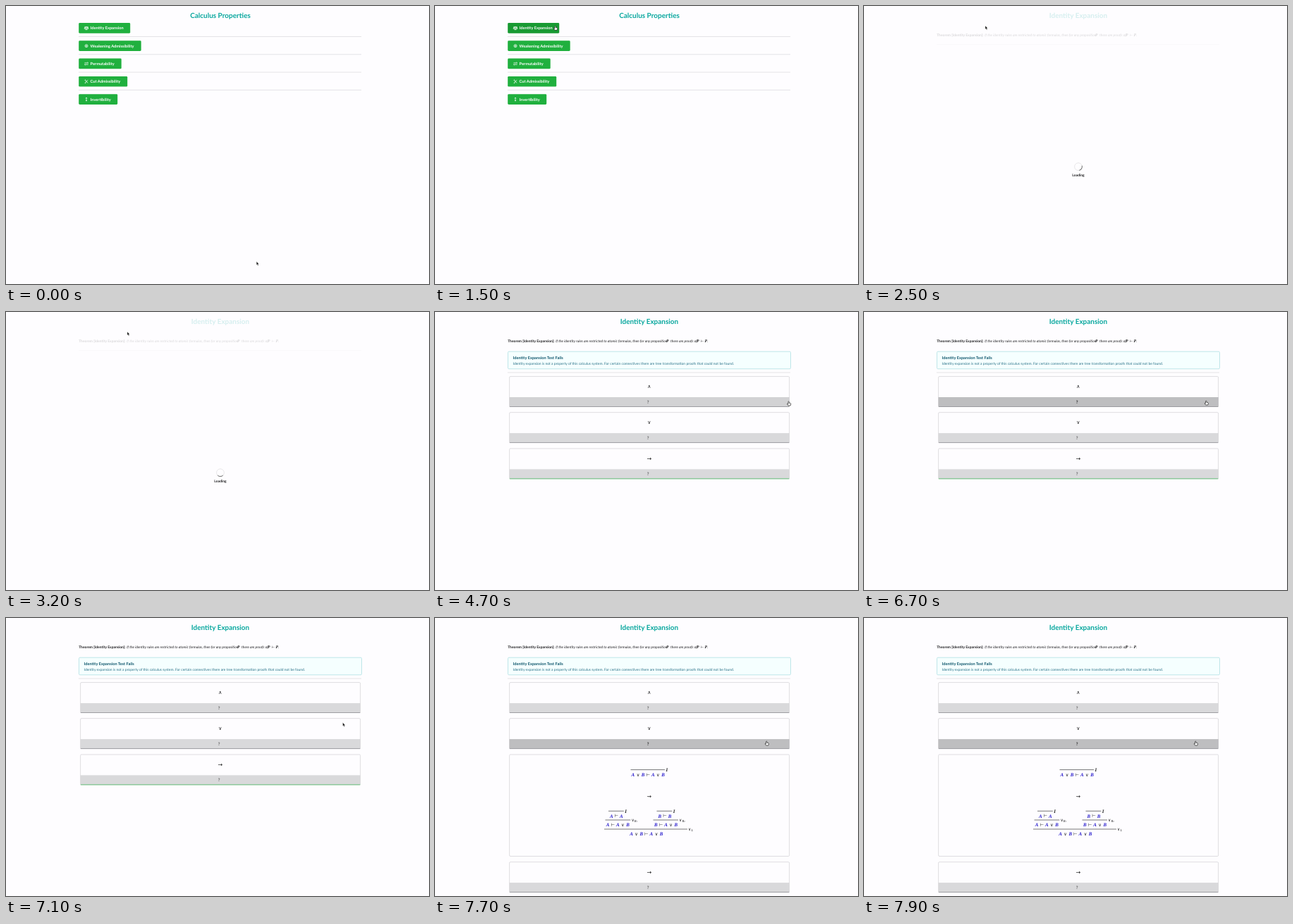
Animation of 600x395 px, one loop 8 s. Source, as an HTML page:

```html
<!DOCTYPE html>
<html lang="en">
<head>
<meta charset="utf-8">
<title>Calculus Properties</title>
<style>
  html, body { margin: 0; width: 100%; height: 100%; overflow: hidden; background: #fefdff; }
  svg { display: block; width: 600px; height: 395px; text-rendering: geometricPrecision; }
  text { font-family: Lato, sans-serif; white-space: pre; }
  .bold { font-weight: 700; }
  .italic { font-style: italic; }
  .mid { text-anchor: middle; }
  .var { font: italic 700 6.9px "Liberation Serif", serif; }
  .sym { font-family: "DejaVu Sans", sans-serif; }
</style>
</head>
<body>
<svg id="stage" viewBox="0 0 600 395"></svg>
<script>
const LOOP = 8000;
const PAGE_LEFT = 1900, LOAD_START = 2300, LOAD_END = 3300;
const OPEN_AND = 5200, CLOSE_AND = 6600, OPEN_OR = 7600;
const TEAL = '#08a79e', BLUE = '#2418cc', INK = '#1c1c1e';
const stage = document.getElementById('stage');

// Cursor stops: time, x, y
const PATH = [
  [0, 355.3, 363], [100, 355.3, 363], [900, 215, 115], [1350, 170, 28.5], [1900, 172, 28],
  [3400, 172, 28], [4000, 543, 100], [4200, 541, 105], [4700, 501.7, 127],
  [5000, 485.3, 126], [6700, 485.3, 126], [7100, 477.7, 148.5], [7450, 470.3, 175], [LOOP, 470.3, 175]
];

const clamp = v => Math.min(1, Math.max(0, v));
const mix = (a, b, k) => a + (b - a) * k;

function cursorAt(t) {
  const i = PATH.findIndex((stop, n) => n && t <= stop[0]);
  const [t0, x0, y0] = PATH[i - 1], [t1, x1, y1] = PATH[i];
  const k = (t - t0) / (t1 - t0);
  return [mix(x0, x1, k), mix(y0, y1, k)];
}

const text = (s, x, y, size, fill = INK, cls = '') =>
  `<text x="${x}" y="${y}" font-size="${size}" fill="${fill}" class="${cls}">${s}</text>`;
const rect = (x, y, w, h, fill, extra = '') =>
  `<rect x="${x}" y="${y}" width="${w}" height="${h}" fill="${fill}" ${extra}/>`;
const line = (x1, x2, y, stroke = INK, width = .6) =>
  `<path d="M${x1} ${y}H${x2}" stroke="${stroke}" stroke-width="${width}"/>`;
const divider = y => line(103, 504, y, '#dedee0', .8);
const title = s => text(s, 304, 16.6, 9.97, TEAL, 'bold mid');
const symbol = (s, x, cy, size) => text(s, x, cy + size * .32, size, INK, 'sym mid');
const variable = (s, x, cy, fill = BLUE) => text(s, x, cy + 2.3, 6.9, fill, 'var mid');

// Icons are drawn around their own centre.
const BUTTONS = [
  ['Identity Expansion', 73, 'M0-2.4V2.2M-2.5-1.6H2.5M-1.5 2.2H1.5M-3 .8 -1.9-1.5 -.8 .8ZM.8 .8 1.9-1.5 3 .8Z'],
  ['Weakening Admissibility', 88.5, 'M-2 0A2 2 0 1 1 2 0A2 2 0 1 1-2 0M-1 0H1M0-1V1'],
  ['Permutability', 60.5, 'M-2.6-1.1H2.6L1.4-2.1M2.6 1.1H-2.6L-1.4 2.1'],
  ['Cut Admissibility', 69, 'M-1.6-1.5 2.2 2M-1.6 1.5 2.2-2M-2.3-1.8A.7 .7 0 1 1-1-1.3M-2.3 1.8A.7 .7 0 1 0-1 1.3'],
  ['Invertibility', 55, 'M0-2.4V2.4M-1-1.4 0-2.5 1-1.4M-1 1.4 0 2.5 1 1.4']
];

function menuPage(hover) {
  return title('Calculus Properties') + BUTTONS.map(([label, width, icon], i) => {
    const y = 24 + i * 25.3;
    const fill = i === 0 ? `rgb(${mix(32, 24, hover)},${mix(176, 154, hover)},${mix(62, 50, hover)})` : '#20b03e';
    return rect(103.2, y, width, 14.7, fill, 'rx="1.4"')
      + `<path transform="translate(114 ${y + 7.4})" d="${icon}" fill="none" stroke="#fff" stroke-width=".75"/>`
      + text(label, 119.6, y + 9.4, 5.7, '#fff', 'bold')
      + (i < 4 ? divider(y + 19.5) : '');
  }).join('');
}

function theorem() {
  const math = (s, x) => `<tspan x="${x}" class="var" style="font-size:5.8px">${s}</tspan>`;
  return title('Identity Expansion')
    + text('Theorem [Identity Expansion]:', 103.2, 42.7, 4.98, INK, 'bold')
    + text('If the identity rules are restricted to atomic formulas, then for any proposition', 171.3, 42.7, 4.98, INK, 'italic')
    + text('there are proofs of', 334, 42.7, 4.98, INK, 'italic')
    + text(math('P', 328) + math('P', 371) + math('P', 382.5) + '.', 0, 42.7, 4.98)
    + symbol('⊢', 379, 41, 5);
}

function loader(t) {
  const angle = (t - LOAD_START) / 600 * 360;
  return '<circle cx="304" cy="228.3" r="5.4" fill="none" stroke="#e2e1e4" stroke-width=".8"/>'
    + `<path transform="translate(304 228.3) rotate(${angle})" d="M-3.8-3.8A5.4 5.4 0 0 1 3.8-3.8" fill="none" stroke="#666" stroke-width=".9"/>`
    + text('Loading', 304, 242.2, 4.98, INK, 'bold mid');
}

function sequent(tokens, cx, cy) {
  const step = 7.1, start = cx - (tokens.length - 1) * step / 2;
  return [...tokens].map((c, i) => /[AB]/.test(c)
    ? variable(c, start + i * step, cy) : symbol(c, start + i * step, cy, 6.3)).join('');
}

// A rule line with its name to the right and the conclusion below.
function rule(tokens, cx, y, x1, x2, name = 'I', sub = '', index = '') {
  const label = name === 'I' ? variable('I', x2 + 2.8, y, INK) : symbol(name, x2 + 3.2, y, 5.8)
    + text(`${sub}<tspan font-size="3" dy=".6">${index}</tspan>`, x2 + 5.4, y + 2.7, 4.6, INK, 'italic" style="font-family:Liberation Serif,serif');
  return line(x1, x2, y) + label + sequent(tokens, cx, y + 6.9);
}

const frame = (y, h) => rect(105.6, y, 397, h, '#fefdff', 'rx="1.4" stroke="#d6d5d9" stroke-width=".8"');

function card(connective, y, hover, edge) {
  const shade = mix(217, 190, hover);
  return frame(y, 42.8)
    + symbol(connective, 303.8, y + 14.5, connective === '→' ? 8 : 7)
    + rect(105.4, y + 29.4, 397.4, 13.4, `rgb(${shade},${shade},${shade + 2})`)
    + line(105.8, 502.4, y + 42.9, edge, .9)
    + text('?', 302.2, y + 38.4, 6, hover > .5 ? '#222' : '#58585a', 'bold mid');
}

const andProof = () => frame(142.5, 60.4) + rule('A∧B⊢A∧B', 302.2, 164.3, 277.5, 326);

const orProof = () => frame(194, 144.5)
  + rule('A∨B⊢A∨B', 302.2, 215.6, 277.5, 326)
  + symbol('⇝', 304, 253.4, 7.5)
  + rule('A⊢A', 257.3, 274.3, 246, 267.8)
  + rule('A⊢A∨B', 259.3, 287, 241.5, 277.3, '∨', 'R', '1')
  + rule('B⊢B', 326, 274.3, 314.5, 336.3)
  + rule('B⊢A∨B', 327.5, 287, 309.5, 345, '∨', 'R', '2')
  + rule('A∨B⊢A∨B', 299.8, 300, 240, 358, '∨', 'L');

function resultPage(t, andHover, orHover) {
  const andOpen = t >= OPEN_AND && t < CLOSE_AND, orOpen = t >= OPEN_OR;
  const shift = andOpen ? 68.7 : 0;
  return theorem()
    + rect(103.5, 56.2, 401, 24.6, '#f5ffff', 'rx="1.4" stroke="#a5dbe0" stroke-width=".7"')
    + text('Identity Expansion Test Fails', 110.6, 66.6, 5.7, '#0e566c', 'bold')
    + text('Identity expansion is not a property of this calculus system. For certain connectives there are tree transformation proofs that could not be found.', 110.6, 74.5, 4.98, '#276f86')
    + divider(86)
    + card('∧', 91.6, andHover, '#96969a')
    + (andOpen ? andProof() : '')
    + card('∨', 142.7 + shift, orHover, '#96969a')
    + (orOpen ? orProof() : '')
    + card('→', 194 + (orOpen ? 152.7 : shift), 0, andOpen || orOpen ? '#96969a' : '#57b86b');
}

function cursor(t, hand) {
  const [x, y] = cursorAt(t);
  const shape = hand
    ? '<path d="M-.7 .5Q0-.4 .6 .5V2.2L2.7 2.7Q3.3 3 3.1 3.9L2.5 6H-.6L-2.3 3.7Q-2.2 2.8-.7 3.8Z" fill="#fff" stroke="#222" stroke-width=".7"/>'
    : '<path d="M0 0V5L1.1 4.1 1.9 6 2.8 5.6 2 3.8H3.5Z" fill="#111" stroke="#fff" stroke-width=".35"/>';
  return `<g transform="translate(${x} ${y})">${shape}</g>`;
}

function scene(t) {
  const hoverBetween = (from, to) => t < to ? clamp((t - from) / 200) : 0;
  const menuHover = hoverBetween(1290, PAGE_LEFT);
  const andHover = hoverBetween(4650, 6850);
  const orHover = hoverBetween(7390, LOOP);
  let page = '';
  if (t < PAGE_LEFT) page = menuPage(menuHover);
  else if (t >= LOAD_END) page = resultPage(t, andHover, orHover);
  else if (t >= LOAD_START) page = `<g opacity=".16">${theorem()}${divider(54.5)}</g>` + loader(t);
  return page + cursor(t, menuHover + andHover + orHover > 0);
}

function draw(now) {
  stage.innerHTML = scene(now % LOOP);
  requestAnimationFrame(draw);
}
draw(0);
</script>
</body>
</html>
```
